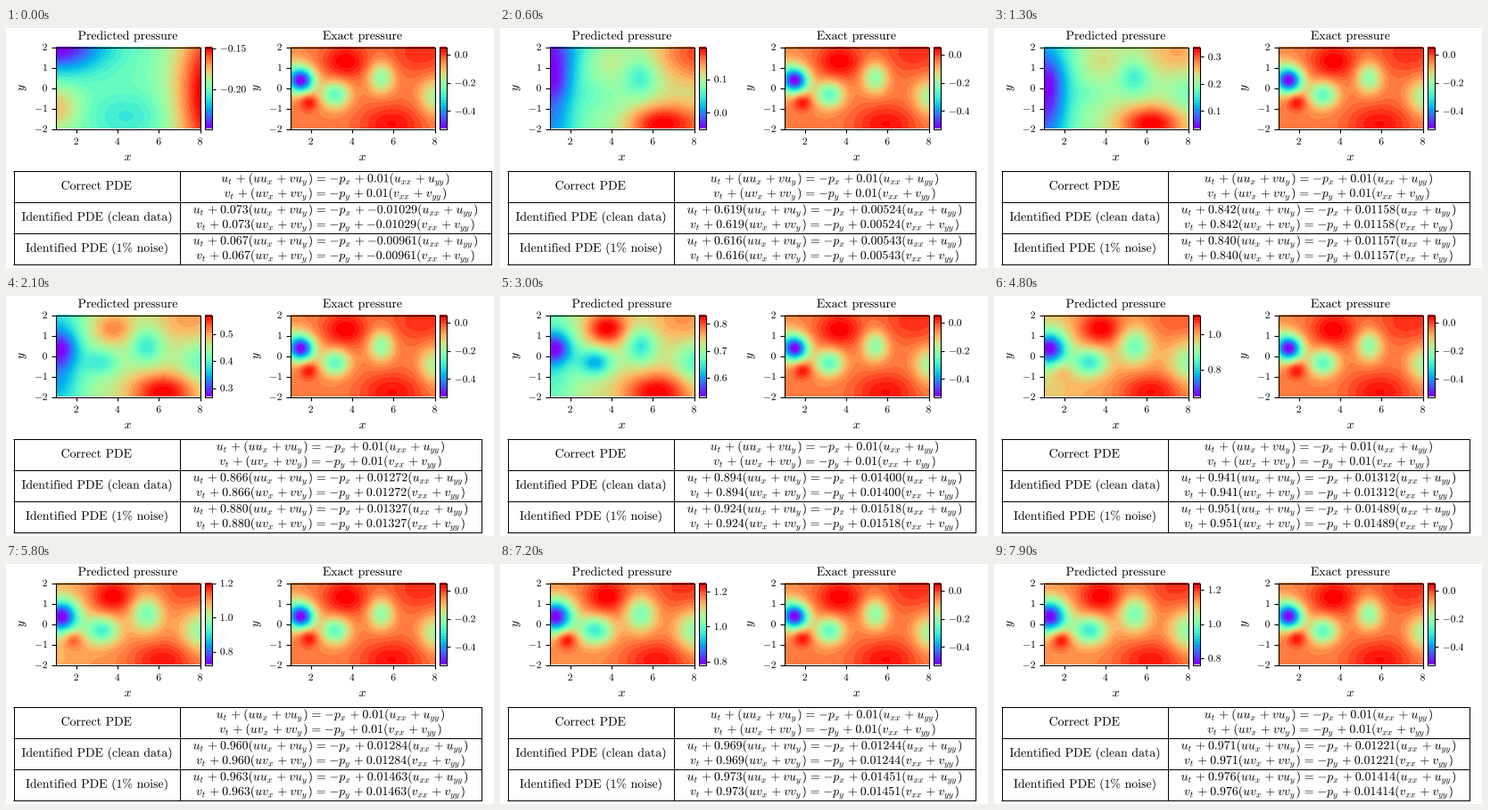
A matplotlib script for the animation above (8000 ms loop, 547 by 270 pixels).

```python
import math

import numpy as np
import matplotlib.pyplot as plt
from matplotlib.animation import FuncAnimation
from matplotlib.patches import PathPatch, Rectangle
from matplotlib.path import Path
from matplotlib.textpath import TextPath

W, H, DPI = 547, 270, 64
PX = 72 / DPI                      # points per pixel
EM, SMALL = 13.84, 11.5            # text sizes in pixels
TOP, BOTTOM = 21.5, 113.5
TICK = 4.9
LEVELS = 32
FRAMES, STEP_MS = 80, 100

plt.rcParams['mathtext.fontset'] = 'cm'
fig = plt.figure(figsize=(W / DPI, H / DPI), dpi=DPI, facecolor='white')
stage = fig.add_axes([0, 0, 1, 1])
stage.axis('off')


# ---------- text as outlines ----------
cache = {}


def glyphs(tex):
    """Outline of a formula, one unit per em, origin on the baseline."""
    if tex not in cache:
        tp = TextPath((0, 0), f'${tex}$', size=1)
        cache[tex] = Path(tp.vertices, tp.codes)
    return cache[tex]


def span(path):
    """Left and right edge of the drawn points."""
    keep = (path.codes != Path.CLOSEPOLY) & (path.codes != Path.STOP)
    xs = path.vertices[keep, 0]
    return xs.min(), xs.max()


def shift(path, dx):
    return Path(path.vertices + (dx, 0), path.codes)


def roman(text):
    text = text.replace('%', r'\%').replace(' ', r'\hspace{0.38}')
    return glyphs(rf'\mathrm{{{text}}}')


def number(text):
    """Outline and advance width of a number."""
    out, x = [], 0
    for c in text:
        out.append(shift(glyphs('{-}' if c == '-' else rf'\mathrm{{{c}}}'), x))
        x += {'-': 0.778, '.': 0.278}.get(c, 0.5)
    return Path.make_compound_path(*out), x


def place(path, x, y, size=EM, align='c', upright=False):
    dx = 0
    if align != 'l':
        x0, x1 = span(path)
        dx = -(x0 + x1) / 2 if align == 'c' else -x1
    px, py = (path.vertices + (dx, 0)).T * size
    px, py = (-py, -px) if upright else (px, -py)
    return Path(np.column_stack([x + px, y + py]), path.codes)


def ink(paths=()):
    path = Path.make_compound_path(*paths) if paths else Path(np.zeros((1, 2)))
    return stage.add_artist(PathPatch(path, fc='k', lw=0))


def line(xs=(), ys=(), width=1.1):
    return stage.plot(xs, ys, color='k', lw=width * PX,
                      solid_capstyle='butt')[0]


def segments(parts):
    """Join (x0, y0, x1, y1) pieces into one broken line."""
    xs, ys = [], []
    for x0, y0, x1, y1 in parts:
        xs += [x0, x1, np.nan]
        ys += [y0, y1, np.nan]
    return xs, ys


# ---------- equations ----------
PLUS = r'\hspace{0.26}{+}\hspace{0.26}'
EQUALS = r'\hspace{0.12}=\hspace{0.12}'


def sub(base, index):
    return rf'{base}_{{{index}}}\hspace{{0.09}}'


def flush(tex):
    path = glyphs(tex)
    left, right = span(path)
    return shift(path, -left), right - left


def pieces(w, axis):
    head = sub(w, 't') + PLUS
    mid = ('(u' + sub(w, 'x') + PLUS + 'v' + sub(w, 'y') + ')' + EQUALS
           + '{-}' + sub('p', axis) + PLUS)
    tail = '(' + sub(w, 'xx') + PLUS + sub(w, 'yy') + ')'
    return [flush(p) for p in (head, mid, tail)]


PIECES = {'u': pieces('u', 'x'), 'v': pieces('v', 'y')}


def equation(w, inertia, viscosity):
    out, x = [], 0
    for (piece, width), value in zip(PIECES[w], (inertia, viscosity, '')):
        out.append(shift(piece, x))
        x += width + 0.28
        if value:
            digits, advance = number(value)
            out.append(shift(digits, x))
            x += advance
        x += 0.1
    return Path.make_compound_path(*out)


# ---------- pressure fields ----------
X, Y = np.meshgrid(np.linspace(1, 8, 162), np.linspace(2, -2, 92))


def bump(x, y, sx, sy):
    return np.exp(-((X - x) / sx) ** 2 / 2 - ((Y - y) / sy) ** 2 / 2)


def banded(f):
    f = (f - f.min()) / (f.max() - f.min())
    return np.minimum(np.floor(f * LEVELS), LEVELS - 1) / (LEVELS - 1)


KEYS = [0, 1.3, 3.0, 4.0, 5.8, 7.2, 7.9]
BASE = [0.48, 0.57, 0.66, 0.75, 0.80, 0.82]
# x, y, width, height -> strength at the first six key times
MODES = [
    ((1.25, 0.35, 0.60, 0.58), (0, -0.05, -0.40, -0.65, -0.76, -0.80)),
    ((1.00, -0.30, 0.90, 2.20), (0, -0.55, -0.22, -0.10, -0.05, 0)),
    ((1.80, -0.75, 0.35, 0.33), (0, 0, 0, 0, 0.18, 0.24)),
    ((3.75, 1.35, 0.75, 0.60), (0, 0.10, 0.35, 0.28, 0.22, 0.20)),
    ((3.20, -0.33, 0.58, 0.48), (0, -0.05, -0.36, -0.38, -0.40, -0.42)),
    ((5.40, 0.50, 0.52, 0.60), (0, -0.20, -0.28, -0.28, -0.32, -0.32)),
    ((6.20, -1.80, 1.20, 0.70), (0, 0.45, 0.35, 0.26, 0.18, 0.16)),
    ((8.00, -0.35, 0.60, 0.70), (0, -0.10, -0.20, -0.20, -0.25, -0.27)),
    ((7.50, 1.80, 1.30, 0.90), (0, 0.20, 0.15, 0.12, 0.12, 0.12)),
]
shapes = [bump(*where) for where, _ in MODES]

# untrained field, fades out first
start = (-0.50 * bump(1, 2, 1.7, 0.9) + 0.25 * bump(1, -1, 0.8, 0.8)
         + 0.60 * bump(8.6, -0.3, 1.3, 3) - 0.12 * bump(4.5, -1.4, 1.3, 0.8))

exact = (0.80 - 0.80 * bump(1.52, 0.35, 0.45, 0.45)
         - 0.18 * bump(1, 0.6, 0.5, 0.6) + 0.20 * bump(1.85, -0.68, 0.33, 0.32)
         + 0.20 * bump(3.65, 1.3, 0.75, 0.6)
         - 0.42 * bump(3.15, -0.35, 0.48, 0.45)
         - 0.33 * bump(5.4, 0.5, 0.42, 0.52)
         - 0.26 * bump(8, -0.45, 0.48, 0.6)
         + 0.17 * bump(5.9, -1.8, 1.1, 0.7)
         + 0.12 * bump(7.3, 1.7, 1.2, 0.8))


def predicted(t):
    keys = KEYS[:6]
    f = np.interp(t, keys, BASE) + max(0, 1 - t / KEYS[1]) * start
    for shape, (_, amps) in zip(shapes, MODES):
        f = f + np.interp(t, keys, amps) * shape
    return f


LOW = [-0.2486, 0.0344, 0.529, 0.583, 0.722, 0.780, 0.761]
HIGH = [-0.1484, 0.336, 0.833, 1.037, 1.201, 1.249, 1.239]

# coefficients learnt from clean and noisy data
CLEAN = ([0.073, 0.842, 0.894, 0.926, 0.960, 0.969, 0.971],
         [-0.01029, 0.01158, 0.01400, 0.01334, 0.01284, 0.01244, 0.01221])
NOISY = ([0.067, 0.840, 0.924, 0.942, 0.963, 0.973, 0.976],
         [-0.00961, 0.01157, 0.01518, 0.01510, 0.01463, 0.01451, 0.01414])


# ---------- panels ----------
def image(data, x0, x1):
    return stage.imshow(data, cmap='rainbow', vmin=0, vmax=1, aspect='auto',
                        interpolation='nearest',
                        extent=(x0, x1, BOTTOM, TOP), zorder=1)


def frame(x0, x1):
    stage.add_artist(Rectangle((x0, TOP), x1 - x0, BOTTOM - TOP, fill=False,
                               ec='k', lw=1.1 * PX, zorder=3))


def panel(left, title, data):
    right = left + 162
    mid = (left + right) / 2
    img = image(data, left, right)
    frame(left, right)
    texts = [place(roman(title), mid, 13), place(glyphs('x'), mid, 149),
             place(glyphs('y'), left - 35.5, 67.5, upright=True)]
    marks = []
    for v in (2, 4, 6, 8):
        x = left + (v - 1) * 162 / 7
        marks.append((x, BOTTOM, x, BOTTOM + TICK))
        texts.append(place(number(str(v))[0], x, 131.2, SMALL))
    for v in range(-2, 3):
        y = 67.5 - 23 * v
        marks.append((left - TICK, y, left, y))
        texts.append(place(number(str(v))[0], left - 9.6, y + 3.7, SMALL, 'r'))
    line(*segments(marks))
    ink(texts)
    image(banded(np.linspace(1, 0, 184)[:, None]), right + 5, right + 13)
    frame(right + 5, right + 13)
    return img, line(), ink(), right + 13


def scale_ticks(lo, hi):
    raw = (hi - lo) / 4
    mag = 10 ** math.floor(math.log10(raw))
    step = next(s * mag for s in (1, 2, 2.5, 5, 10) if s * mag >= raw - 1e-9)
    places = next(d for d in range(1, 6)
                  if abs(step * 10 ** d - round(step * 10 ** d)) < 1e-6)
    first, last = math.ceil(lo / step), math.floor(hi / step)
    return [(k * step, f'{k * step:.{places}f}')
            for k in range(first, last + 1)]


def set_scale(marks, names, x, lo, hi):
    parts, texts = [], []
    for v, text in scale_ticks(lo, hi):
        y = BOTTOM - (v - lo) / (hi - lo) * (BOTTOM - TOP)
        parts.append((x, y, x + TICK, y))
        texts.append(place(number(text)[0], x + 9.3, y + 3.7, SMALL, 'l'))
    marks.set_data(*segments(parts))
    names.set_path(Path.make_compound_path(*texts))


guess, guess_marks, guess_names, guess_x = panel(
    55.5, 'Predicted pressure', banded(predicted(0)))
_, true_marks, true_names, true_x = panel(
    318.5, 'Exact pressure', banded(exact))
set_scale(true_marks, true_names, true_x, -0.526, 0.053)

# ---------- table ----------
RULES = [160.5, 195.5, 230.5, 265.5]
LEFT, DIVIDER = 8.5, 194.5
ROWS = ['Correct PDE', 'Identified PDE (clean data)',
        'Identified PDE (1% noise)']
grid = line(width=1)
ink([place(roman(name), (LEFT + DIVIDER) / 2, rule + 21.2)
     for rule, name in zip(RULES, ROWS)])
formulas = ink()

stage.set_xlim(0, W)
stage.set_ylim(H, 0)


def draw(i):
    t = i * STEP_MS / 1000
    if t < KEYS[1]:                # fast early learning
        t = KEYS[1] * (1 - (1 - t / KEYS[1]) ** 2)

    guess.set_data(banded(predicted(t)))
    set_scale(guess_marks, guess_names, guess_x,
              np.interp(t, KEYS, LOW), np.interp(t, KEYS, HIGH))

    values = [('', '0.01')]
    for inertia, viscosity in (CLEAN, NOISY):
        values.append((f'{np.interp(t, KEYS, inertia):.3f}',
                       f'{np.interp(t, KEYS, viscosity):.5f}'))
    wide = any(v.startswith('-') for _, v in values)
    right = 543.5 if wide else 532.5
    grid.set_data(*segments(
        [(LEFT - 0.5, y, right + 0.5, y) for y in RULES]
        + [(x, RULES[0], x, RULES[-1]) for x in (LEFT, DIVIDER, right)]))

    mid = (DIVIDER + right) / 2
    formulas.set_path(Path.make_compound_path(*[
        place(equation(w, *value), mid, rule + dy)
        for rule, value in zip(RULES, values)
        for w, dy in (('u', 12.9), ('v', 29.5))]))
    return []


anim = FuncAnimation(fig, draw, frames=FRAMES, interval=STEP_MS, repeat=True)
plt.show()
```
